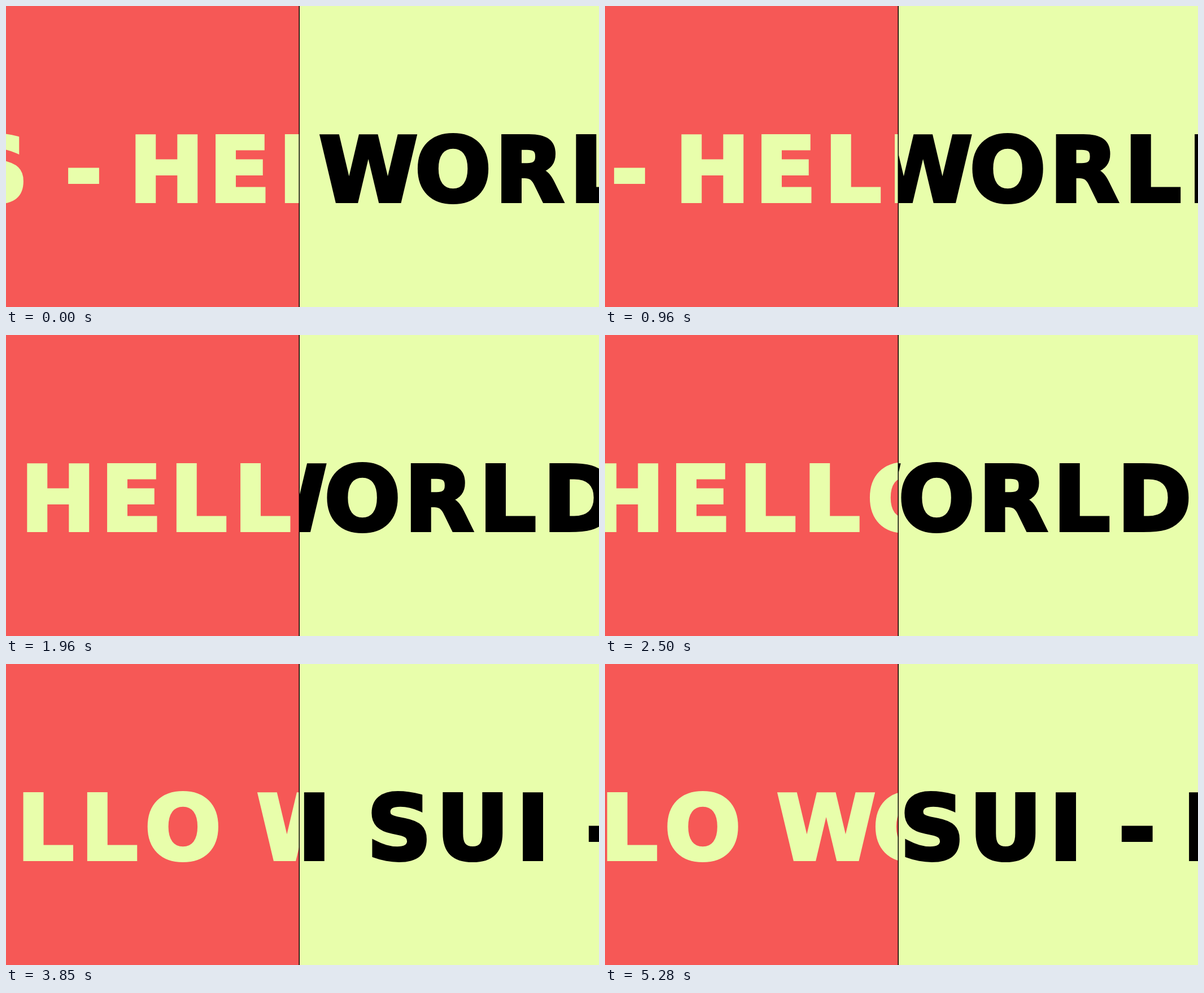
Recreate the animation shown at these times as an HTML page. Size 1050x533 px, loop 5.38 s.

```html
<!DOCTYPE html>
<html lang="en">
<head>
<meta charset="utf-8">
<title>Split marquee</title>
<style>
  html, body { margin: 0; width: 100%; height: 100%; overflow: hidden; }
  svg { display: block; width: 1050px; height: 533px; background: #e8feab; }
  svg svg { background: none; overflow: hidden; }
  text {
    font: bold 159px "DejaVu Sans", sans-serif;
    white-space: pre;
    stroke-width: 6;
  }
  #left { fill: #e8feab; stroke: #e8feab; }
  #right { fill: #000; stroke: #000; }
</style>
</head>
<body>
<svg viewBox="0 0 1050 533">
  <svg width="519" height="533">
    <rect width="519" height="533" fill="#f65856"/>
    <text id="left" y="346">S - HELLO WORLD</text>
  </svg>
  <svg x="520" width="530" height="533" viewBox="520 0 530 533">
    <text id="right" y="346">WORLD NI SUI - HELLO</text>
  </svg>
  <rect x="518.5" width="1.5" height="533" fill="#000"/>
</svg>
<script>
const LOOP = 5380;
const CUT = 2920; // both lines skip ahead here
const UNIT = 170 / 18;

// Letter spacing falls into a few classes, in units of 1/18 em
function advance(c) {
  if (" -".includes(c)) return 6 * UNIT;
  if (c === "I") return 7 * UNIT;
  if (c === "L") return 12 * UNIT;
  if ("ES".includes(c)) return 13 * UNIT;
  if ("RD".includes(c)) return 14 * UNIT;
  return (c === "W" ? 18 : 15) * UNIT;
}

function marquee(id, start, speed, skip) {
  const node = document.getElementById(id);
  let x = 0;
  const places = [...node.textContent].map(c => {
    const place = x;
    x += advance(c);
    return place.toFixed(2);
  });
  node.setAttribute("x", places.join(" "));

  return t => {
    const shift = start - speed * t / 1000 - (t >= CUT ? skip : 0);
    node.setAttribute("transform", `translate(${shift.toFixed(2)} 0)`);
  };
}

const moves = [
  marquee("left", -74.8, 98, 86),
  marquee("right", 554, 81.8, 610.5)
];

const origin = performance.now();
function tick() {
  const t = (performance.now() - origin) % LOOP;
  for (const move of moves) move(t);
  requestAnimationFrame(tick);
}
tick();
</script>
</body>
</html>
```
